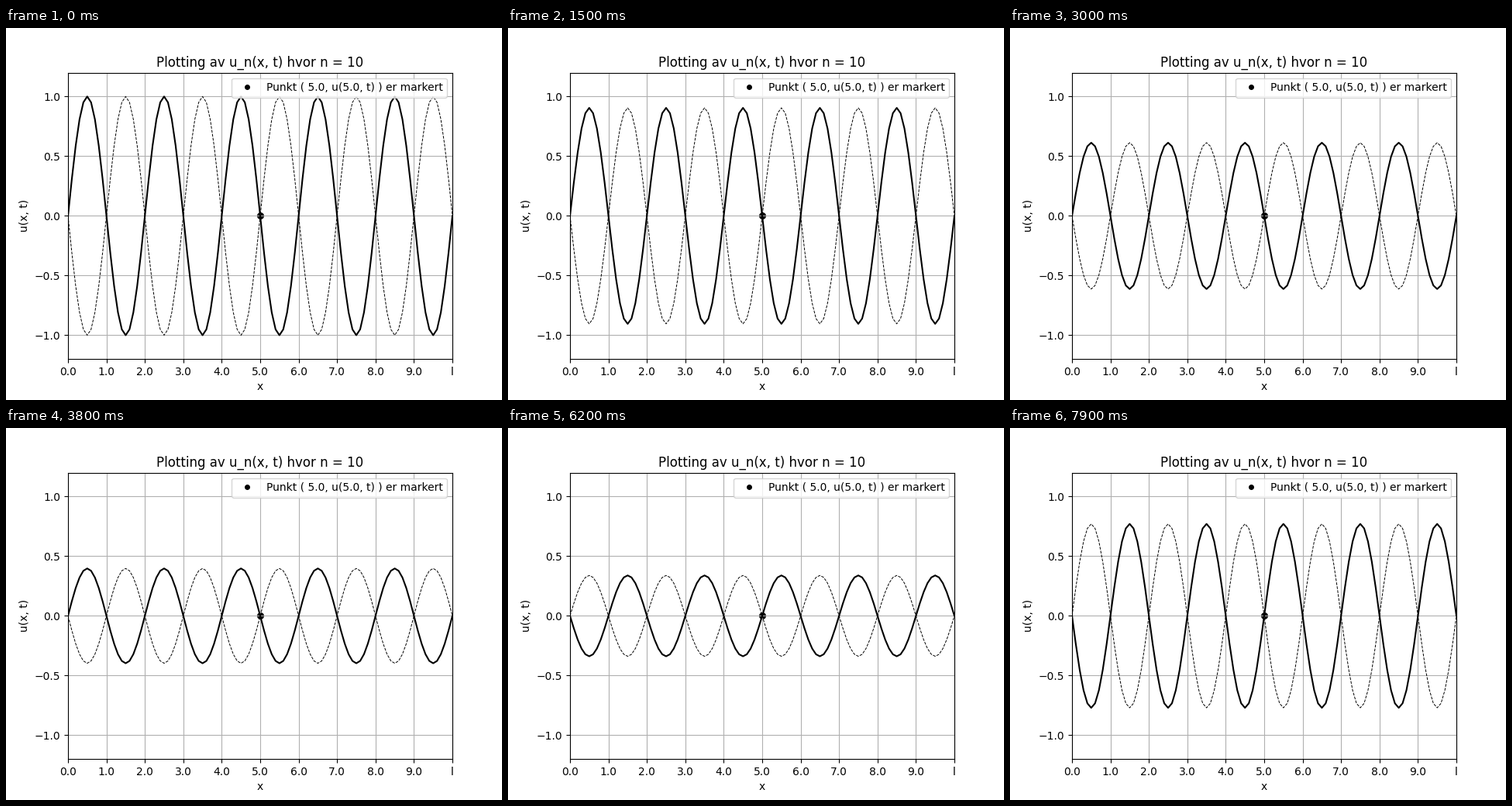
These frames come from a looping animation (640 by 480 pixels, 8 s). A matplotlib script:

```python
import numpy as np
import matplotlib.pyplot as plt
from matplotlib.animation import FuncAnimation

N = 10          # mode number
LENGTH = 10.0
FRAMES = 80
INTERVAL = 100  # ms

plt.rcParams["font.family"] = "DejaVu Sans"

x = np.linspace(0, LENGTH, 101)
mode = np.sin(N * np.pi * x / LENGTH)


def amplitude(frame):
    """Standing wave swing; the start position is held for two frames."""
    return np.cos(np.pi * max(0, frame - 1) / 100)


fig, ax = plt.subplots(figsize=(6.4, 4.8), dpi=100)
ax.set_xlim(0, LENGTH)
ax.set_ylim(-1.2, 1.2)
ax.set_xticks(range(11), [f"{i:.1f}" for i in range(10)] + ["l"])
ax.set_title("Plotting av u_n(x, t) hvor n = 10")
ax.set_xlabel("x")
ax.set_ylabel("u(x, t)")
ax.grid(True)

wave, = ax.plot(x, mode, "k-", lw=1.5)
mirror, = ax.plot(x, -mode, "k--", lw=0.7)
ax.scatter([LENGTH / 2], [0], s=30, color="black")
key, = ax.plot([], [], "ko", ms=4,
               label="Punkt ( 5.0, u(5.0, t) ) er markert")
ax.legend(handles=[key], loc="upper right")


def update(frame):
    u = amplitude(frame) * mode
    wave.set_ydata(u)
    mirror.set_ydata(-u)
    return wave, mirror


anim = FuncAnimation(fig, update, frames=FRAMES, interval=INTERVAL,
                     repeat=True, repeat_delay=0)
plt.show()
```
